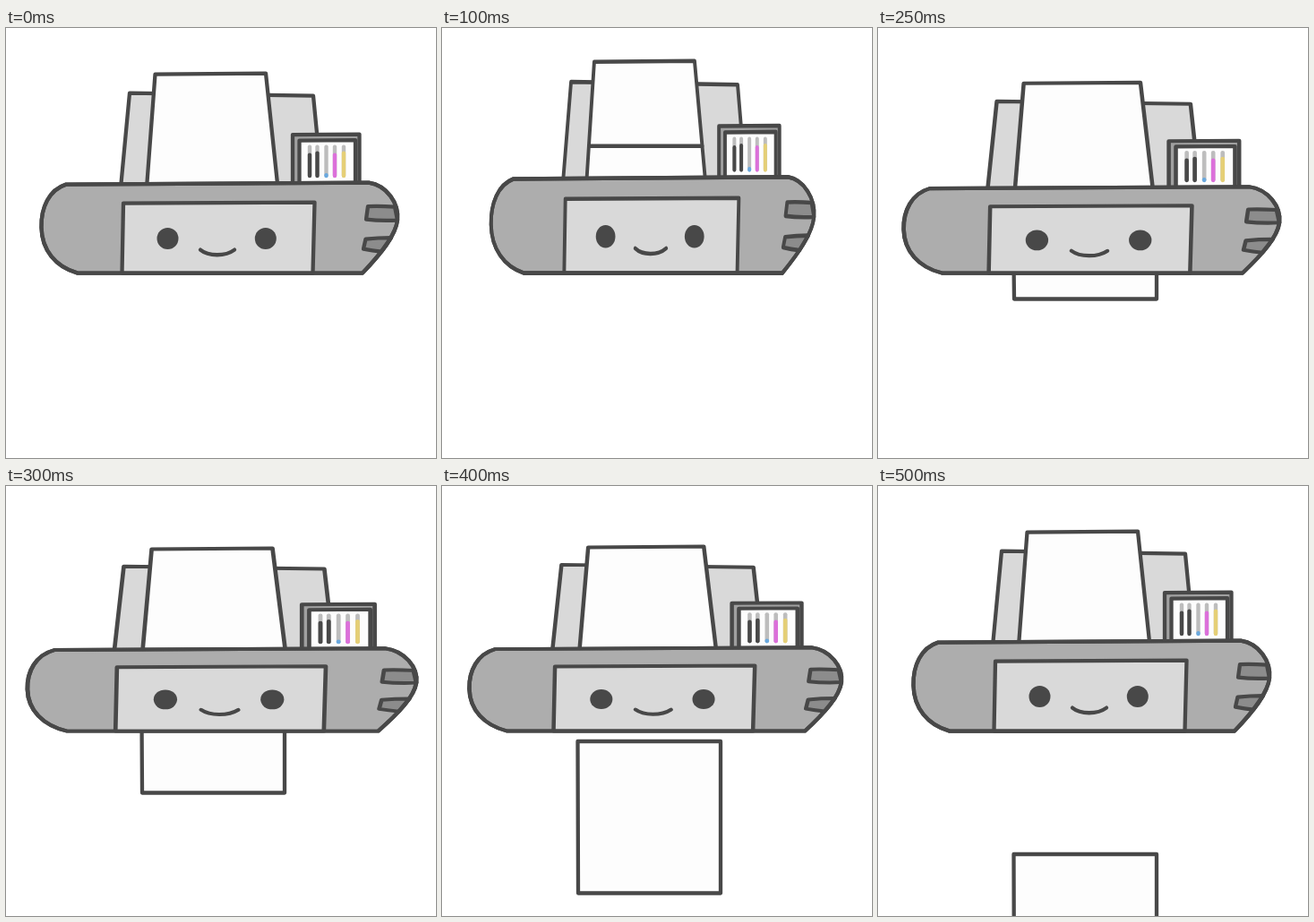
Animation, 480 px wide and 480 px high, one loop 0.55 s. Source, as an HTML page with a canvas:

```html
<!DOCTYPE html>
<html>
<head>
<meta charset="utf-8">
<style>
  html, body { margin: 0; width: 100%; height: 100%; overflow: hidden; background: #fff; }
  canvas { display: block; }
</style>
</head>
<body>
<canvas id="stage" width="480" height="480"></canvas>
<script>
const ctx = document.getElementById('stage').getContext('2d');
const INK = '#484848', LIGHT = '#d9d9d9', BODY = '#adadad', PAPER = '#fdfdfd';
const STEP = 50, BASE = 273, OFFSET_Y = 0.6;

// Squash and stretch per step: scale x, scale y, shift x
const poses = [
  [1, 1, 0], [0.95, 1.033, 9.8], [0.907, 1.062, 18.9], [0.872, 1.097, 26.5],
  [0.847, 1.126, 33.2], [1.055, 0.954, -13], [1.092, 0.915, -19.2],
  [1.125, 0.878, -24.6], [1.045, 0.924, -10.8], [1.02, 0.964, -5], [1, 1, 0]
];
// Top edge of the printed sheet, from the step where it appears
const SHEET_START = 5, sheetTops = [133, 173, 213, 285, 348, 411];

function shape(d, fill, width = 4.3) {
  const path = new Path2D(d);
  if (fill) {
    ctx.fillStyle = fill;
    ctx.fill(path);
  }
  ctx.strokeStyle = INK;
  ctx.lineWidth = width;
  ctx.stroke(path);
}

function bar(x, top, bottom, color) {
  ctx.strokeStyle = color;
  ctx.lineWidth = 4.4;
  ctx.beginPath();
  ctx.moveTo(x, top);
  ctx.lineTo(x, bottom);
  ctx.stroke();
}

function drawInkBox() {
  shape('M320 180V118.500L394.500 118V180Z', '#a0a0a0');
  shape('M327.500 180V125L390 124.500V180Z', PAPER);
  [[339, 141, INK], [347.5, 139, INK], [357.5, 163.5, '#6aa9df'],
   [367, 141, '#dc70da'], [377, 139, '#e5cf76']].forEach(([x, level, color]) => {
    bar(x, 132, 164, '#bdbdbd');
    bar(x, level, 164.5, color);
  });
}

function drawFeed(step) {
  shape('M138 72L343 75L353 178H128Z', LIGHT);
  drawInkBox();
  shape('M166.500 51L290 50L303.500 178H157Z', PAPER);
  const y = 50 + step * 44.7;
  if (step && y < 173) {
    const k = (y - 50) / 123;
    shape(`M${166.5 - 9 * k} ${y}H${290 + 13 * k}`);
  }
}

function drawBody() {
  const outline = 'M67 174L405 172C425 175 439 195 437 214C435 231 419 251 398 273' +
    'H80C55 266 40 247 39.500 222C39 200 48 180 67 174Z';
  shape(outline, BODY);
  shape('M404 198.500Q418 198 434 199L437 214Q418 215 402 213Z', '#8c8c8c');
  shape('M401.500 235Q415 233.500 430 233.500L419 249Q409 248 399 246Z', '#8c8c8c');
  shape('M131 195L344.500 194L342.500 273H129.500Z', LIGHT);
  shape(outline);
  ctx.fillStyle = INK;
  for (const x of [180.5, 289.8]) {
    ctx.beginPath();
    ctx.arc(x, 234.5, 12, 0, Math.PI * 2);
    ctx.fill();
  }
  shape('M217 247C226 254.500 245 254.500 255 247');
}

function draw(step) {
  ctx.setTransform(1, 0, 0, 1, 0, 0);
  ctx.clearRect(0, 0, 480, 480);
  ctx.lineCap = ctx.lineJoin = 'round';
  if (step >= SHEET_START) {
    const top = sheetTops[step - SHEET_START];
    // Only the part that has left the printer is visible
    const from = Math.max(top, BASE - 10);
    shape(`M151.500 ${from}L311 ${from}V${top + 169.5}H152Z`, PAPER);
  }
  const [sx, sy, dx] = poses[step];
  ctx.setTransform(sx, 0, 0, sy, dx, BASE * (1 - sy) + OFFSET_Y);
  drawFeed(step);
  drawBody();
}

function frame() {
  draw(Math.floor(performance.now() / STEP) % poses.length);
  requestAnimationFrame(frame);
}
frame();
</script>
</body>
</html>
```
